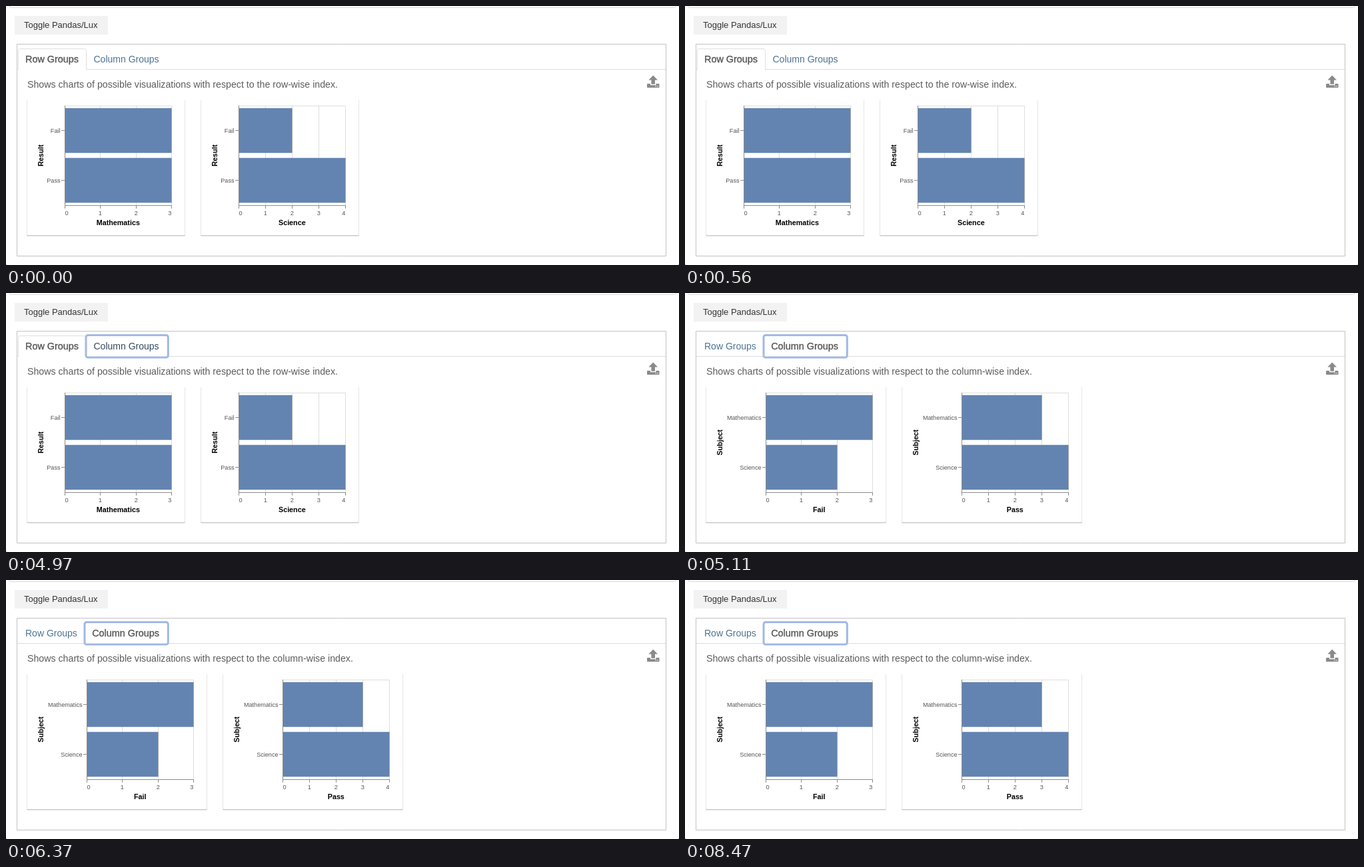
These frames come from a looping animation (1010 by 390 pixels, 8890 ms). An HTML page with a canvas:

```html
<!DOCTYPE html>
<html lang="en">
<head>
<meta charset="utf-8">
<title>Index groups</title>
<style>
html, body { margin: 0; width: 100%; height: 100%; overflow: hidden; background: #fff; }
canvas { display: block; }
</style>
</head>
<body>
<canvas id="stage" width="1010" height="390"></canvas>
<script>
const ctx = document.getElementById('stage').getContext('2d');
const LOOP = 8890, HOVER = 4620, FOCUS = 4970, SWITCH = 5110;
const FONT = '"Liberation Sans", Arial, sans-serif';
const BAR = '#6384b1', GRID = '#dedede', AXIS = '#8c8c8c';
const TOP = 150, HEIGHT = 150, WIDTH = 160, STEP = 75;

const rowView = {
  hint: 'Shows charts of possible visualizations with respect to the row-wise index.',
  cardWidth: 237, plotOffset: 57, axisTitle: 'Result', labels: ['Fail', 'Pass'],
  charts: [
    { x: 31, title: 'Mathematics', values: [3, 3], max: 3 },
    { x: 292, title: 'Science', values: [2, 4], max: 4 }
  ]
};
const columnView = {
  hint: 'Shows charts of possible visualizations with respect to the column-wise index.',
  cardWidth: 270, plotOffset: 90, axisTitle: 'Subject', labels: ['Mathematics', 'Science'],
  charts: [
    { x: 31, title: 'Fail', values: [3, 2], max: 3 },
    { x: 325, title: 'Pass', values: [3, 4], max: 4 }
  ]
};

function text(str, x, y, size, color, align = 'left', weight = 'normal') {
  ctx.font = `${weight} ${size}px ${FONT}`;
  ctx.textAlign = align;
  ctx.fillStyle = color;
  ctx.fillText(str, x, y);
}

function rect(x, y, w, h, color) {
  ctx.fillStyle = color;
  ctx.fillRect(x, y, w, h);
}

function roundBox(x, y, w, h, r, color, lineWidth = 1) {
  ctx.beginPath();
  ctx.roundRect(x, y, w, h, r);
  ctx.strokeStyle = color;
  ctx.lineWidth = lineWidth;
  ctx.stroke();
}

function card(x, w) {
  rect(x, 142, 1, 203, '#e6e6e6');
  rect(x + w, 142, 1, 203, '#e6e6e6');
  rect(x, 345, w + 1, 1, '#cbcbcb');
  rect(x + 1, 346, w - 1, 1, '#e4e4e4');
}

function chart(view, { x, title, values, max }) {
  const left = x + view.plotOffset;
  const scale = v => left + Math.round(v * WIDTH / max);
  card(x, view.cardWidth);

  roundBox(left + .5, TOP + .5, WIDTH, HEIGHT, 0, GRID);
  for (let v = 1; v < max; v++) rect(scale(v), TOP, 1, HEIGHT, GRID);

  values.forEach((v, i) => {
    const y = TOP + i * STEP + 3.75;
    rect(left, y, scale(v) - left, 67.5, BAR);
    rect(scale(v), y, 1, 67.5, '#a5a5a8');
    rect(left - 5, TOP + i * STEP + 37, 5, 1, AXIS);
    text(view.labels[i], left - 6.5, TOP + i * STEP + 41, 9.1, '#555', 'right');
  });

  rect(left, TOP, 1, HEIGHT, AXIS);
  rect(left, TOP + HEIGHT, WIDTH + 1, 1, AXIS);
  for (let v = 0; v <= max; v++) {
    rect(scale(v), TOP + HEIGHT, 1, 5, AXIS);
    const align = v === 0 ? 'left' : v === max ? 'right' : 'center';
    text(v, scale(v) + .4, 315, 9.2, '#555', align);
  }

  text(title, left + WIDTH / 2 + .3, 330, 10.75, '#000', 'center', 'bold');
  ctx.save();
  ctx.translate(x + 25.3, TOP + HEIGHT / 2);
  ctx.rotate(-Math.PI / 2);
  text(view.axisTitle, 0, 0, 10.75, '#000', 'center', 'bold');
  ctx.restore();
}

function tabLabel(str, x, color, active) {
  text(str, x, 85, active ? 14.4 : 14, color);
  if (!active) return;
  ctx.strokeStyle = color;
  ctx.lineWidth = .35;
  ctx.strokeText(str, x, 85);
}

function tabBox(x, w, color) {
  rect(x, 64, w, 31, '#fff');
  ctx.beginPath();
  ctx.moveTo(x + .5, 95.5);
  ctx.arcTo(x + .5, 64.5, x + w / 2, 64.5, 3);
  ctx.arcTo(x + w - .5, 64.5, x + w - .5, 95.5, 3);
  ctx.lineTo(x + w - .5, 95.5);
  ctx.strokeStyle = color;
  ctx.lineWidth = 1;
  ctx.stroke();
}

function tabs(t) {
  const switched = t >= SWITCH;
  rect(17, 95, 973, 1, '#dedede');
  if (!switched) {
    tabBox(18, 103, '#dedede');
    rect(19, 95, 101, 1, '#fff');
  }
  if (t >= FOCUS) {
    const x = switched ? 118 : 120;
    rect(x, 64, 243 - x, 33, '#fff');
    roundBox(x, 63.5, 243.3 - x, 33.5, 3, '#a2b8e6', 3);
  } else if (t >= HOVER) {
    tabBox(121, 121, '#ececec');
  }
  tabLabel('Row Groups', 29, switched ? '#4b7393' : '#555', !switched);
  const columnColor = switched ? '#555' : t >= HOVER ? '#34495e' : '#4b7393';
  tabLabel('Column Groups', switched ? 129.2 : 131.5, columnColor, switched);
}

function exportIcon() {
  ctx.fillStyle = '#8a8a8a';
  ctx.beginPath();
  ctx.roundRect(962, 117, 18.5, 6, 1);
  ctx.fill();
  rect(967, 116, 8.5, 3.2, '#fff');
  ctx.fillStyle = '#8a8a8a';
  ctx.beginPath();
  [[971.2, 104.5], [978, 111.5], [974, 111.5], [974, 117.8], [968.4, 117.8], [968.4, 111.5], [964.4, 111.5]]
    .forEach(p => ctx.lineTo(...p));
  ctx.fill();
  rect(974.5, 120.2, 1.3, 1.3, '#fff');
  rect(977.3, 120.2, 1.3, 1.3, '#fff');
}

function frame() {
  roundBox(4.5, -20, 1001, 22.5, 3, '#d9d9d9');
  for (const x of [0, 1009]) rect(x, 389, 1, 1, '#aaa');
  rect(13, 15, 140, 28, '#f2f2f2');
  text('Toggle Pandas/Lux', 27, 33, 13, '#333');
  roundBox(16.5, 57.5, 974, 319, 0, '#c2c2c2');
}

function draw(now) {
  const t = now % LOOP;
  const view = t < SWITCH ? rowView : columnView;
  rect(0, 0, 1010, 390, '#fff');
  frame();
  tabs(t);
  text(view.hint, 32, 123, 14.2, '#5c5c5c');
  exportIcon();
  view.charts.forEach(c => chart(view, c));
}

const start = performance.now();
function tick() {
  draw(performance.now() - start);
  requestAnimationFrame(tick);
}
tick();
</script>
</body>
</html>
```
